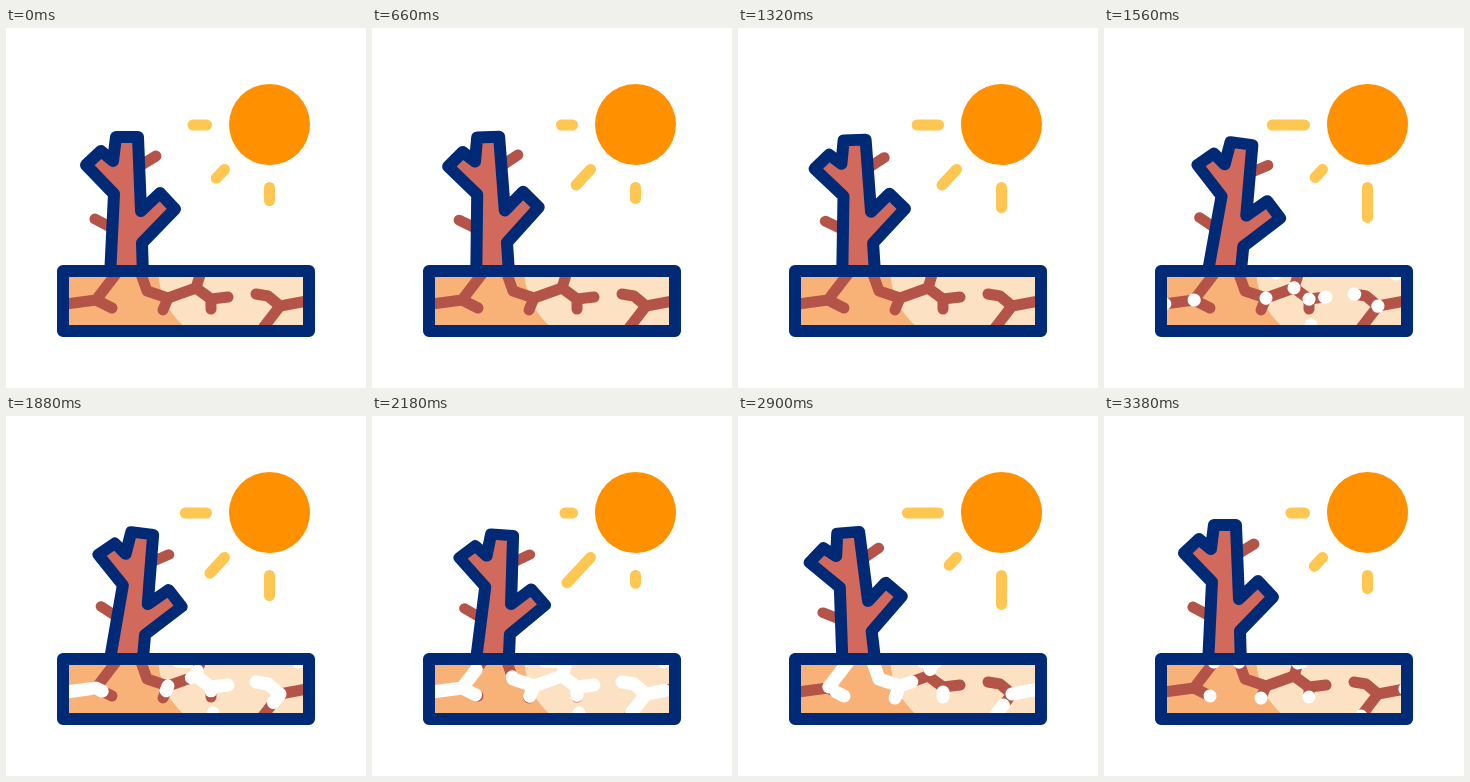
Animation of 360 by 360 pixels, one loop 3.4 s. Source, as an HTML page:

```html
<!DOCTYPE html>
<html lang="en">
<head>
<meta charset="utf-8">
<title>Drought</title>
<style>
  html, body { margin: 0; height: 100%; overflow: hidden; background: #fff; }
  svg { display: block; width: 100vw; height: 100vh; }
  path { fill: none; stroke-linecap: round; stroke-linejoin: round; }
  .outline { stroke: #002976; stroke-width: 12; }
  .crack { stroke: #b45449; stroke-width: 11; }
  .shine { stroke: #fff; stroke-width: 13; }
  .ray { stroke: #ffc751; stroke-width: 11; }
</style>
</head>
<body>
<svg viewBox="0 0 360 360">
  <clipPath id="soil"><path d="M57 243H303V303H57Z"/></clipPath>
  <circle cx="263.5" cy="96.5" r="40.5" fill="#ff9100"/>
  <path class="ray" id="west"/>
  <path class="ray" id="diagonal"/>
  <path class="ray" id="south"/>

  <g id="tree">
    <path class="crack" d="M150 128L132 139M89 191L108 201"/>
    <path class="outline" style="fill:#d2695d" d="M104 249L108 166L80 137L95 123L107 133L110 109L132 109L135 183L154 165L169 181L136 215L137 249Z"/>
  </g>

  <g clip-path="url(#soil)">
    <path style="fill:#fce2c2" d="M57 243H303V303H57Z"/>
    <path style="fill:#f8b176" d="M57 243H152Q154 268 163 281T183 303H57Z"/>
    <g id="cracks"></g>
    <g id="shines"></g>
  </g>
  <path class="outline" d="M57 243H303V303H57Z"/>
</svg>
<script>
const LOOP = 3400;
const $ = id => document.getElementById(id);

const cracks = [
  "M60 276L90 272L110 246",
  "M90 272L106 280",
  "M222 269L205 271L190 260L162 270L141 263L135 246",
  "M205 271L205 281",
  "M190 260L194 247",
  "M162 270L157 282",
  "M250 266L262 268L274 278L301 273",
  "M274 278L257 300"
];
// Highlights that only graze the edges of the soil
const glints = ["M172 245L198 246", "M207 297L207 314", "M292 246L292 232"];

function addPaths(parent, list, className) {
  return list.map(d => {
    const path = document.createElementNS("http://www.w3.org/2000/svg", "path");
    path.setAttribute("d", d);
    path.setAttribute("class", className);
    path.setAttribute("pathLength", 1);
    return parent.appendChild(path);
  });
}
addPaths($("cracks"), cracks, "crack");
const shines = addPaths($("shines"), [...cracks, ...glints], "shine");

const clamp = x => Math.min(1, Math.max(0, x));
const ease = x => x * x * (3 - 2 * x);
const ramp = (t, from, to) => ease(clamp((t - from) / (to - from)));

// Eased value through keys spread evenly from start to the end of the loop
function keyed(t, keys, start = 400) {
  const last = keys.length - 1;
  const p = clamp((t - start) / (LOOP - start)) * last;
  const i = Math.min(last - 1, Math.floor(p));
  return keys[i] + (keys[i + 1] - keys[i]) * ease(p - i);
}

function draw(t) {
  const long = keyed(t, [13.5, 7.5, 32.5, 7.5, 32.5, 13.5]);
  const slant = keyed(t, [8.5, 24.5, 7.5, 24.5, 7.5, 8.5]);
  $("west").setAttribute("d", `M200.5 97h${-long}`);
  $("south").setAttribute("d", `M263.5 159.5v${long * 0.9 + 1}`);
  $("diagonal").setAttribute("d", `M218.5 141.5l${-slant * 0.96} ${slant * 1.03}`);

  const tilt = keyed(t, [0, -9.1, 8.4, 4.1, -5.2, 0], 480);
  const height = keyed(t, [1, 1, 0.96, 0.93, 0.942, 1]);
  $("tree").setAttribute("transform",
    `translate(120 243) rotate(${tilt}) scale(1 ${height}) translate(-120 -243)`);

  const head = ramp(t, 1500, 2400), tail = ramp(t, 2400, 3400);
  $("shines").style.display = t > 1500 ? "" : "none";
  for (const path of shines) {
    path.style.strokeDasharray = `${Math.max(0.001, head - tail)} 3`;
    path.style.strokeDashoffset = -tail;
  }
}

const begin = performance.now();
function tick() {
  draw((performance.now() - begin) % LOOP);
  requestAnimationFrame(tick);
}
tick();
</script>
</body>
</html>
```
